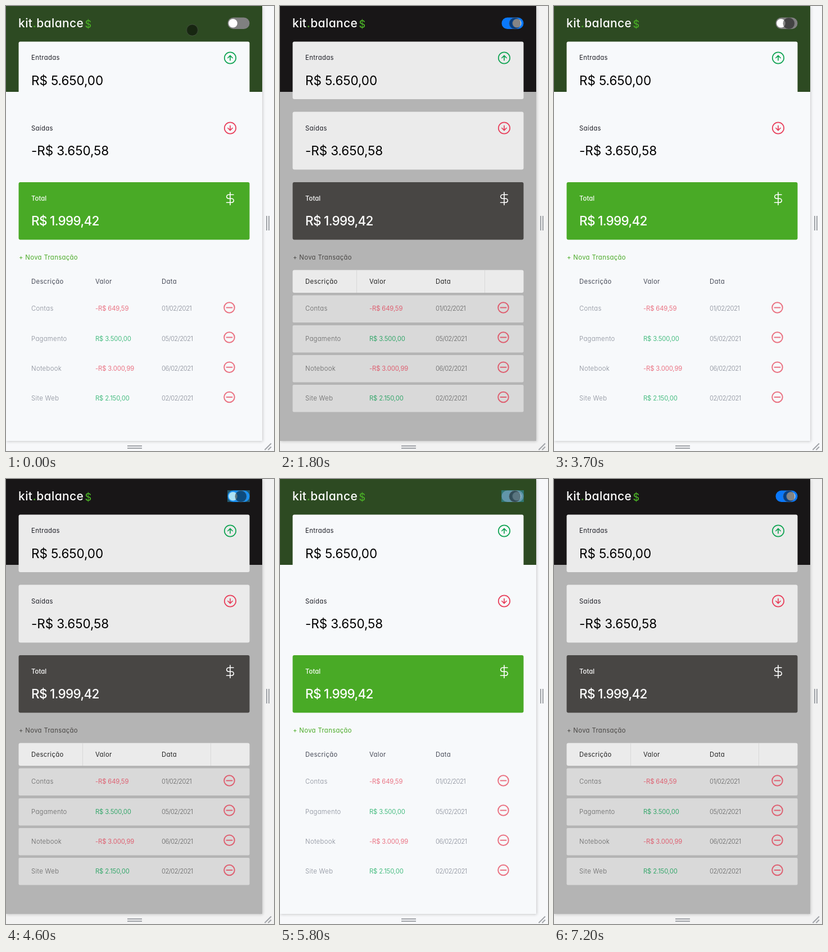
These frames come from a looping animation (477 by 793 pixels, 9.1 s). An HTML page:

```html
<!DOCTYPE html>
<html lang="pt-BR">
<head>
<meta charset="utf-8">
<title>Painel financeiro</title>
<style>
html, body { margin: 0; width: 100%; height: 100%; overflow: hidden; }
body {
  position: relative;
  background: var(--frame);
  animation: theme 9.1s step-end infinite;
}
.page {
  position: absolute; left: 0; top: 0; width: 456px; height: 775px;
  background: var(--bg);
  box-shadow: 1px 1px 5px rgba(0, 0, 0, .2);
}
svg { position: absolute; left: 0; top: 0; display: block; }
text {
  font-family: Inter, "Open Sans", sans-serif;
  font-feature-settings: "cv11";
  font-size: 11.25px;
  letter-spacing: .38px;
  white-space: pre;
}
.line { fill: none; stroke-linecap: round; stroke-linejoin: round; }
.logo { font-size: 21px; font-weight: 500; letter-spacing: .4px; fill: #fff; }
.accent { fill: #49aa26; }
.label { fill: #1d1e26; }
.amount { font-size: 22.5px; letter-spacing: -.1px; fill: #000; }
.sum text { fill: #fff; font-weight: 500; letter-spacing: .1px; }
.sum .amount { letter-spacing: -.7px; }
.card { fill: var(--card); }
.head text { fill: var(--head); }
.row rect { fill: var(--row); }
.row text { fill: var(--ink); font-weight: 300; }
.row .date { letter-spacing: -.5px; }
.row .plus, .row .minus { letter-spacing: -.12px; font-weight: 400; }
.row .plus { fill: var(--plus); }
.row .minus { fill: var(--minus); }
.del { stroke: var(--minus); stroke-width: 2; }
.knob { animation: knob 9.1s step-end infinite; }
.tap { animation: tap 9.1s step-end infinite; }
.pointer { animation: pointer 9.1s linear infinite; }

@keyframes theme {
  0%, 37.362%, 63.736% {
    --frame: #f7f8fa; --bg: #f7f9fb; --top: #2d4a22; --card: #f7f9fb;
    --total: #49aa26; --link: #49aa26; --row: #f7f9fb; --rule: #f7f9fb;
    --head: #474b58; --ink: #868b97; --plus: #48bd82; --minus: #ea7383;
    --track: #808080;
  }
  15.384%, 50.549%, 74.725%, 100% {
    --frame: #f2f2f2; --bg: #b4b4b4; --top: #181617; --card: #ebebeb;
    --total: #484644; --link: #484644; --row: #d9d9d9; --rule: #d8d8d8;
    --head: #222; --ink: #636363; --plus: #36a76c; --minus: #de6071;
    --track: #0a78fa;
  }
}
@keyframes knob {
  0%, 15.384% { transform: translateX(0); }
  16.483% { transform: translateX(7.2px); }
  17.582% { transform: translateX(14px); }
  18.681% { transform: translateX(16.8px); }
  19.780%, 37.362% { transform: translateX(17.5px); }
  38.461% { transform: translateX(10.3px); }
  39.560% { transform: translateX(3.5px); }
  40.659%, 50.549% { transform: translateX(0); }
  51.648% { transform: translateX(7.2px); }
  52.747% { transform: translateX(14px); }
  53.846% { transform: translateX(16.8px); }
  54.945%, 63.736% { transform: translateX(17.5px); }
  64.835% { transform: translateX(10.3px); }
  65.934% { transform: translateX(3.5px); }
  67.032%, 74.725% { transform: translateX(0); }
  75.824% { transform: translateX(7.2px); }
  76.923% { transform: translateX(14px); }
  78.021% { transform: translateX(16.8px); }
  79.120%, 100% { transform: translateX(17.5px); }
}
@keyframes tap {
  0%, 17.582%, 39.560%, 52.747%, 65.934%, 76.923%, 100% { opacity: 0; }
  15.384%, 37.362%, 50.549%, 63.736%, 74.725% { opacity: 1; }
}
@keyframes pointer {
  0% { transform: translate(331.5px, 43px); }
  4.395% { transform: translate(331.5px, 43px); animation-timing-function: steps(5, start); }
  9.890%, 100% { transform: translate(418px, 31px); }
}
</style>
</head>
<body>
<div class="page"></div>
<svg width="477" height="793" viewBox="0 0 477 793">
  <defs>
    <g id="del" class="line del"><circle r="9.3"/><path d="M-5 0H5"/></g>
    <g id="arrow" class="line" stroke-width="1.7"><circle r="10.2"/><path d="M0 4.2V-4.2M-4.1 0L0-4.2L4.1 0"/></g>
  </defs>

  <rect width="456" height="153" fill="var(--top)"/>
  <text class="logo" x="22" y="38">kit<tspan class="accent">.</tspan>balance</text>
  <text class="accent" x="140.5" y="39" style="font-size:18px;font-weight:500">$</text>

  <rect x="394.5" y="20.5" width="39" height="20.5" rx="10.2" fill="var(--track)"/>
  <circle class="knob" cx="404" cy="30.7" r="7.8" fill="#fff"/>
  <rect class="tap" x="394" y="20" width="40" height="21" fill="rgba(51,181,229,.4)"/>

  <rect class="card" x="22.5" y="63.5" width="411" height="102.5" rx="3"/>
  <text class="label" x="45" y="96">Entradas</text>
  <text class="amount" x="45" y="141">R$ 5.650,00</text>
  <use href="#arrow" x="399" y="92.5" stroke="#12a454"/>

  <rect class="card" x="22.5" y="188.5" width="411" height="103" rx="3"/>
  <text class="label" x="45" y="222">Saídas</text>
  <text class="amount" x="45" y="266">-R$ 3.650,58</text>
  <use href="#arrow" transform="translate(399 217.5) rotate(180)" stroke="#e83f5b"/>

  <g class="sum">
    <rect x="22.5" y="314" width="411" height="102.5" rx="3" fill="var(--total)"/>
    <text x="45" y="347">Total</text>
    <text class="amount" x="45" y="391">R$ 1.999,42</text>
    <path class="line" stroke="#fff" stroke-width="1.6" d="M399 332V354.5M405 336.2H396.2A3.5 3.5 0 0 0 396.2 343.2H401.8A3.5 3.5 0 0 1 401.8 350.2H392.5"/>
  </g>

  <text x="23" y="452" fill="var(--link)">+ Nova Transação</text>

  <g class="head">
    <rect class="card" x="22.5" y="470.5" width="411" height="40.5" rx="3"/>
    <path d="M136.5 471V511M364.5 471V511" stroke="var(--rule)"/>
    <text x="45" y="495">Descrição</text>
    <text x="159" y="495">Valor</text>
    <text x="277" y="495">Data</text>
  </g>

  <g class="row">
    <rect x="22.5" y="515.5" width="411" height="48.5" rx="2"/>
    <text x="45" y="543">Contas</text>
    <text class="minus" x="159" y="543">-R$ 649,59</text>
    <text class="date" x="277" y="543">01/02/2021</text>
    <use href="#del" x="397.5" y="537.5"/>
  </g>
  <g class="row">
    <rect x="22.5" y="569" width="411" height="48.5" rx="2"/>
    <text x="45" y="597">Pagamento</text>
    <text class="plus" x="159" y="597">R$ 3.500,00</text>
    <text class="date" x="277" y="597">05/02/2021</text>
    <use href="#del" x="397.5" y="590.5"/>
  </g>
  <g class="row">
    <rect x="22.5" y="622" width="411" height="48.5" rx="2"/>
    <text x="45" y="650">Notebook</text>
    <text class="minus" x="159" y="650">-R$ 3.000,99</text>
    <text class="date" x="277" y="650">06/02/2021</text>
    <use href="#del" x="397.5" y="643.7"/>
  </g>
  <g class="row">
    <rect x="22.5" y="675" width="411" height="48.5" rx="2"/>
    <text x="45" y="703">Site Web</text>
    <text class="plus" x="159" y="703">R$ 2.150,00</text>
    <text class="date" x="277" y="703">02/02/2021</text>
    <use href="#del" x="397.5" y="697"/>
  </g>

  <g stroke="#a0a3a8" fill="none" stroke-width="2">
    <path d="M464 374V400M468 374V400M216 784H242M216 788H242"/>
    <path d="M460.5 791L472 779.5M466.5 791L472 785.5"/>
  </g>

  <circle class="pointer" r="10.2" fill="rgba(0,0,0,.48)" stroke="rgba(110,110,110,.45)"/>
</svg>
</body>
</html>
```
